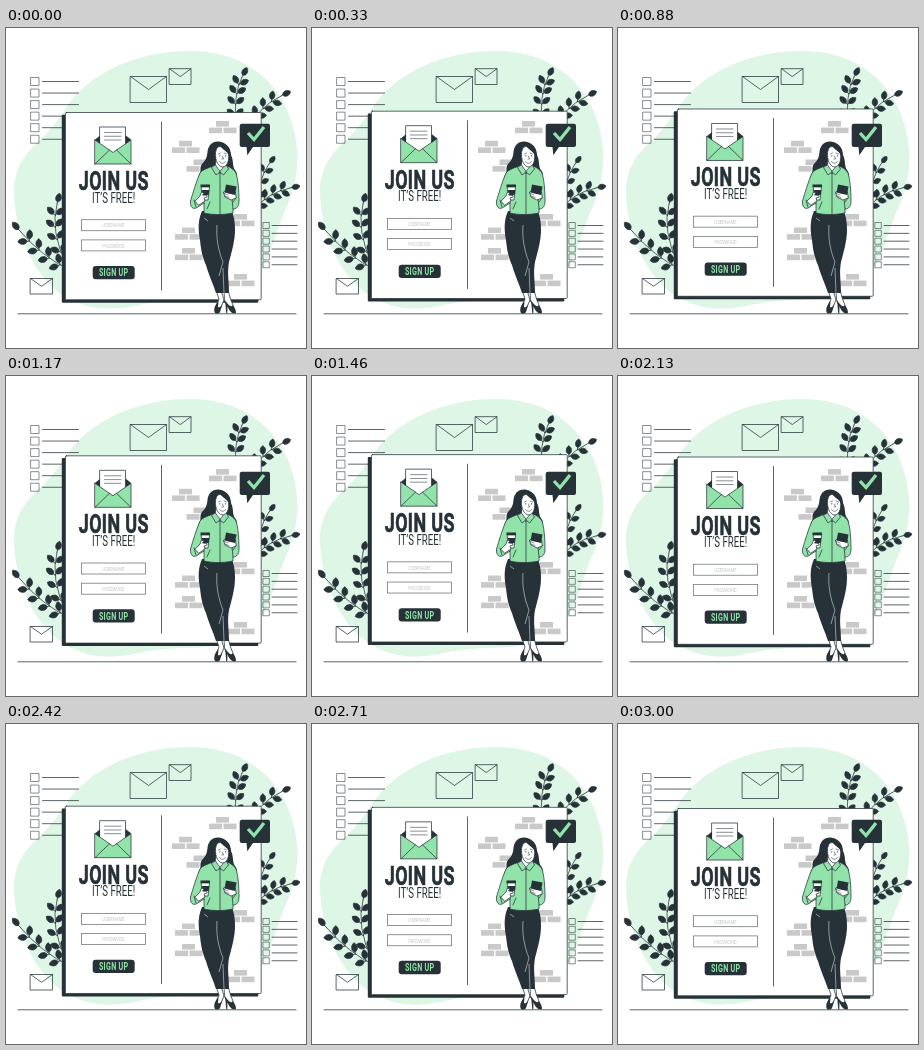
An HTML page that plays this animation: 300x320 px, repeating every 3.04 s.

```html
<!DOCTYPE html>
<html lang="en">
<head>
<meta charset="utf-8">
<title>Join us</title>
<style>
  html, body { margin: 0; width: 100%; height: 100%; overflow: hidden; background: #fff; }
  svg { display: block; width: 100vw; height: 100vh; }
  .line { fill: none; stroke: #263238; stroke-width: .75; stroke-linejoin: round; stroke-linecap: round; }
  .thin { fill: none; stroke: #263238; stroke-width: .55; stroke-linecap: round; }
  .dark { fill: #263238; }
  .mint { fill: #92e3a9; }
  .white { fill: #fff; }
  .edge { stroke: #263238; stroke-width: .75; stroke-linejoin: round; stroke-linecap: round; }
  .field { fill: #fff; stroke: #737a7d; stroke-width: .8; }
  text { font-family: Roboto, "Liberation Sans", sans-serif; text-anchor: middle; }
  .title { font-size: 26px; font-weight: 700; letter-spacing: .02em; fill: #263238; stroke: #263238; stroke-width: .7; }
  .sub { font-size: 14px; font-weight: 400; fill: #263238; }
  .hint { font-size: 6.2px; font-weight: 300; fill: #a8a8a8; }
  .action { font-size: 10.4px; font-weight: 700; letter-spacing: .04em; fill: #92e3a9; }
</style>
</head>
<body>
<svg viewBox="0 0 300 320" xmlns="http://www.w3.org/2000/svg">
  <path fill="#def6e5" d="M8 162C9 139 19 126 34 112C54 94 59 77 75 62C103 36 143 23 184 23C225 23 257 40 276 72C294 104 297 143 281 178C268 207 264 237 245 255C219 278 177 268 137 276C112 282 91 283 70 274C31 259 8 207 8 162Z"/>
  <path class="line" d="M12 285.8H290"/>
  <g id="mail"></g>
  <g id="lists"></g>
  <g id="plants"></g>

  <g id="panel">
    <rect class="dark" x="55.8" y="86.8" width="196.500" height="188" rx="1"/>
    <rect class="white edge" x="59.400" y="84.500" width="195.800" height="187.300" rx="1"/>
    <path class="line" d="M155.500 94V262"/>
    <path class="dark edge" d="M89 112L94 108H120L125 112L107 128Z"/>
    <path class="white edge" d="M94 99H119.500V126H94Z"/>
    <path class="thin" d="M98.500 104.500H115M98.500 108.300H115M98.500 112H115"/>
    <path class="mint edge" d="M89 112L107 124.500L125 112V136H89Z"/>
    <path class="line" d="M89 136L103.500 122M125 136L110.500 122"/>
    <g id="copy"></g>
  </g>

  <g id="bricks" fill="#c9c9c9"></g>

  <g id="woman">
    <!-- hair -->
    <path class="dark" d="M213 113.500C206 113 202 118 201.500 124C201 130 199 133 196 136C193 140 196 143 193 147C191 152 196 156 202 153H224C230 152 233 147 229 142C226 138 228 133 225 127C225 119 219 114 213 113.500Z"/>
    <!-- feet -->
    <path class="white edge" d="M210 262L213 271L209 280L213 283L218.500 271L218 262ZM215 262L218 272L224 282L229 282L224.500 271L222 262Z"/>
    <path class="dark" d="M212.500 273C210 276 207.500 280 208.500 284C209 286 213 286 214 284L217.500 273C216 279 213 280 212 279ZM219 272L220.300 285.500H221.300L221.500 278C223 282 225 285.500 229 285.500C231 285 230 282 226.500 277C225.500 280 222 277 219 272Z"/>
    <path class="dark" d="M196 183C192 192 192 201 194 212C195 223 197 231 200 237C203 248 207 255 210 265H223C223 252 221 245 223 234C226 223 229 212 229 202C229 194 228 188 226 183Z"/>
    <path fill="none" stroke="#fff" stroke-width=".5" d="M211 197C210 209 212 222 217 234L213 248M217 240L218 265M198 190L202 193"/>
    <!-- shirt and sleeves -->
    <path class="mint edge" d="M209 137C203 140 197 141 194 145C190 154 187 165 184.500 173C184 179 187 182 191 179.500L198 175L198 185C206 187 217 187 227 185L227 181C231 181 233 178 233 173C233 162 232 151 230 145C227 140 223 139 219 137Z"/>
    <path class="line" d="M198 175L201 157M214 145V186M227 181L225 160M190 179L188 172M201 181L204 174M227 174L230 170"/>
    <path class="white edge" d="M210 132L209 138L214 146L220 138V131Z"/>
    <path class="mint edge" d="M209 137L205.500 139.500L210 147L214 144ZM220 136.500L222.500 141L217.500 147L214 144Z"/>
    <!-- head -->
    <path class="white edge" d="M210 122C208 129 211 138 216 139C221 139 223.500 133 222.500 126C221 119 212 115 210 122Z"/>
    <path class="dark" d="M208 133C206 124 209 120 214 118C217 122 221 123 224.500 129C225 120 219 114 213 115C206 117 202 126 208 133Z"/>
    <path class="thin" d="M212.500 126L214.500 125M218 125L220.500 126M216.500 128L217.500 131H216M213.500 133.500C215 136 218 136 219.500 133.500"/>
    <circle class="dark" cx="213.800" cy="127.800" r=".6"/><circle class="dark" cx="219.500" cy="127.800" r=".6"/>
    <!-- cup and phone -->
    <path class="white edge" d="M195.500 159H203.500L202 172H197Z"/>
    <path class="dark" d="M194.500 156.500H204V159H194.500ZM196 162H203.300L202.700 167H196.500Z"/>
    <path class="white edge" d="M189 173L194 168L195.500 164L198 165L196.500 167L201 167.500V169L198 170L199 173L193 177Z"/>
    <path class="white edge" d="M230 170L225 172L219 169L217.500 164L220 163L223 165L229 164Z"/>
    <path class="dark" d="M220 156.500L230.500 158.500L229 167L218.500 164.500Z"/>
    <path class="thin" d="M217.500 165L222 167M219 168L223 169.500"/>
  </g>

  <g id="bubble">
    <path class="dark" d="M236 95.700H262Q264 95.700 264 97.700V117Q264 119 262 119H247L241.300 127.300L240.500 119H236Q233.700 119 233.700 117V97.700Q233.700 95.700 236 95.700Z"/>
    <path fill="none" stroke="#92e3a9" stroke-width="3.300" d="M242 105L248 111.500L258 99"/>
  </g>
</svg>
<script>
const LOOP = 3040, FLOAT = 3000, LIFT = 6;
const CONDENSED = 0.69; // one narrow face for all the copy
const $ = id => document.getElementById(id);

const envelope = (x, y, w, h) =>
  `<path class="line" d="M${x} ${y}h${w}v${h}h${-w}zl${w / 2} ${h * .5}l${w / 2} ${-h * .5}"/>`;

function checklist(x, y, size, gap, lineStart, lineEnd) {
  let out = '';
  for (let i = 0; i < 6; i++) {
    const top = y + i * gap;
    out += `<path class="thin" d="M${x} ${top}h${size}v${size}h${-size}z"/>
      <path class="line" d="M${lineStart} ${top + size / 2}H${lineEnd}"/>`;
  }
  return out;
}

// A curved stem with a leaf at the tip and pairs of leaves down the sides.
function frond(x0, y0, cx, cy, x1, y1, pairs, size = 5) {
  const leaf = (x, y, deg) =>
    `<path class="dark edge" transform="translate(${x} ${y}) rotate(${deg}) scale(${size})" stroke-width=".1"
      vector-effect="non-scaling-stroke" d="M0 0H.4C.7 -.75 1.7 -.75 2.2 0C1.7 .75 .7 .75 .4 0"/>`;
  let out = `<path class="line" d="M${x0} ${y0}Q${cx} ${cy} ${x1} ${y1}"/>`;
  for (let i = 0; i <= pairs; i++) {
    const t = 1 - i * .82 / pairs, s = 1 - t;
    const x = s * s * x0 + 2 * s * t * cx + t * t * x1;
    const y = s * s * y0 + 2 * s * t * cy + t * t * y1;
    const dx = s * (cx - x0) + t * (x1 - cx), dy = s * (cy - y0) + t * (y1 - cy);
    const deg = Math.atan2(dy, dx) * 180 / Math.PI;
    out += i ? leaf(x, y, deg - 48) + leaf(x, y, deg + 48) : leaf(x, y, deg);
  }
  return out;
}

const label = (kind, x, y, words) =>
  `<text class="${kind}" transform="translate(${x} ${y}) scale(${CONDENSED} 1)">${words}</text>`;

const field = (y, hint) =>
  `<rect class="field" x="75.500" y="${y}" width="64" height="11"/>` + label('hint', 107.5, y + 7.8, hint);

// Two bricks side by side with one centred above.
const brickPile = (x, y) => [[7, 0], [0, 6.6], [14.5, 6.6]]
  .map(([dx, dy]) => `<rect x="${x + dx}" y="${y + dy}" width="13" height="5.600"/>`).join('');

$('mail').innerHTML = envelope(124.5, 48.5, 36, 26) + envelope(163.5, 40.7, 21.5, 15.8) + envelope(24.5, 250.5, 22, 15.5);
$('lists').innerHTML = checklist(25, 49.5, 8, 11.55, 36.5, 72.5)
  + checklist(257.3, 194.5, 6, 7.85, 266, 291);
$('plants').innerHTML =
  frond(230, 100, 227, 66, 236, 49, 4, 4.8)
  + frond(240, 106, 250, 80, 275, 68, 4, 4.8)
  + frond(250, 180, 253, 149, 263, 136, 3, 4.3)
  + frond(246, 184, 260, 165, 284, 160, 4, 4.6)
  + frond(64, 242, 36, 229, 14, 203, 4, 5.2)
  + frond(60, 236, 44, 203, 51, 176, 4, 5);
$('copy').innerHTML =
  label('title', 107.8, 162, 'JOIN US')
  + label('sub', 107.6, 174.8, 'IT’S FREE!')
  + field(191.7, 'USERNAME') + field(211.9, 'PASSWORD')
  + '<rect class="dark" x="86.700" y="238" width="42" height="13.300" rx="3"/>'
  + label('action', 107.7, 248.4, 'SIGN UP');
$('bricks').innerHTML = [[203, 93], [166, 112.8], [180.5, 131.5], [221, 186], [169, 199.5], [169, 220], [221, 246]]
  .map(([x, y]) => brickPile(x, y)).join('');

function draw(now) {
  const phase = Math.min(now % LOOP, FLOAT) / FLOAT;
  const rise = LIFT * (1 - Math.abs(1 - 2 * phase));
  $('panel').setAttribute('transform', `translate(0 ${-rise})`);
}

const start = performance.now();
function tick() {
  draw(performance.now() - start);
  requestAnimationFrame(tick);
}
tick();
</script>
</body>
</html>
```
